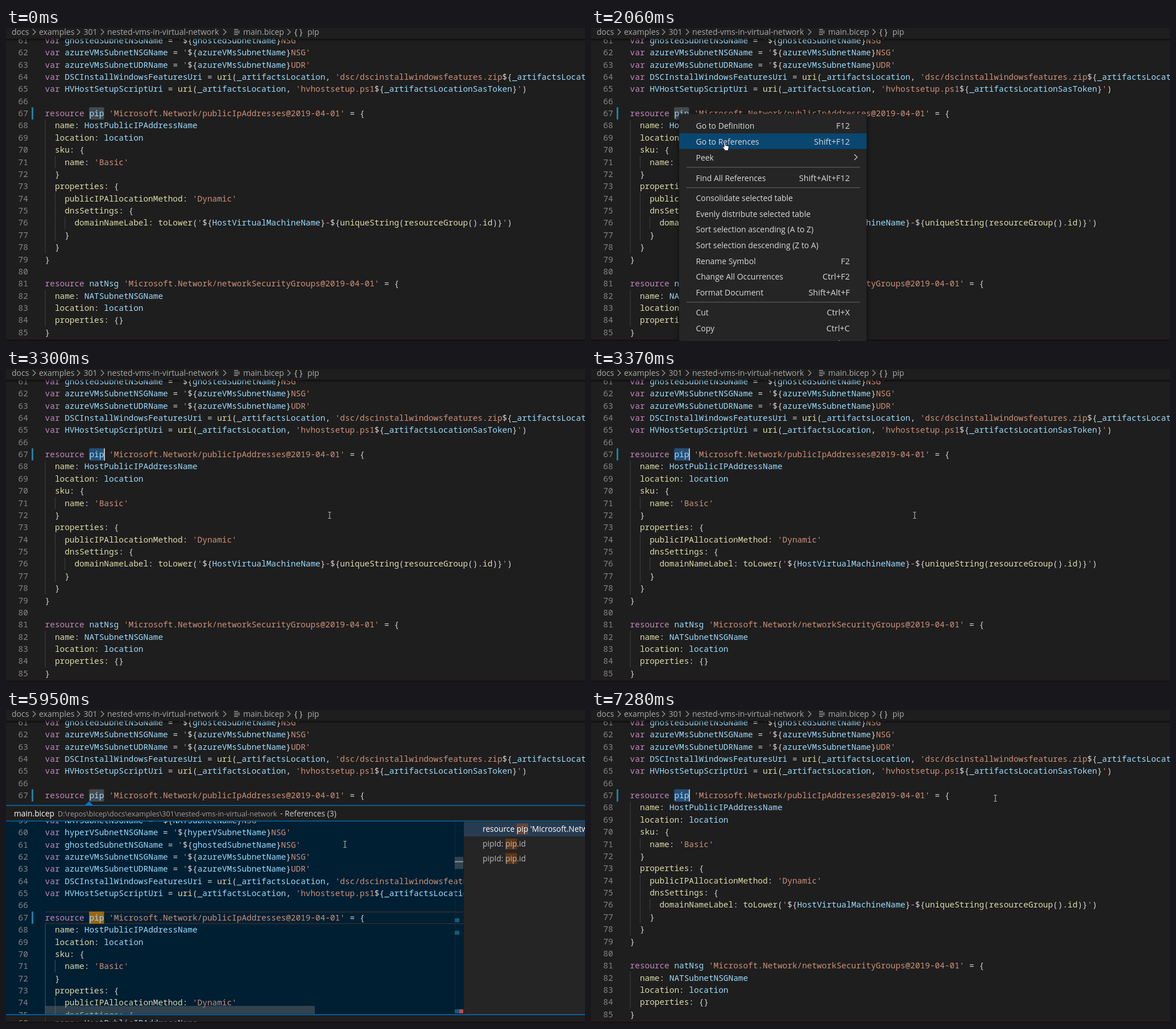
Recreate the animation shown at these times as an HTML page. Size 1018 by 550 pixels, loop 7.36 s.

```html
<!DOCTYPE html>
<html lang="en">
<head>
<meta charset="utf-8">
<title>Peek references</title>
<style>
  html, body { margin: 0; width: 100%; height: 100%; overflow: hidden; background: #1e1e1e; }
  svg { display: block; }
  text { white-space: pre; }
  .code { font: 14.41px "Noto Sans Mono", monospace; }
  .ui { font: 13.8px "Open Sans", sans-serif; fill: #ccc; }
  .item, .keys { font: 13.95px "Open Sans", sans-serif; fill: #dadada; }
  .keys { font-size: 14.5px; text-anchor: end; }
  .crumb { font: 14px "Open Sans", sans-serif; fill: #a9a9a9; }
  .box { fill: #252526; filter: drop-shadow(0 2px 4px #000a); }
</style>
</head>
<body>
<svg id="stage" width="1018" height="550" viewBox="0 0 1018 550"></svg>
<script>
const LOOP = 7360, ROW = 21.375, CHAR = 8.646, LEFT = 68.6;
const ZONE = 378.5, PEEK_SHIFT = 214.8, FIRST = 59;
const SOURCE = `var NATSubnetNSGName = '\${NATSubnetName}NSG'
var hyperVSubnetNSGName = '\${hyperVSubnetName}NSG'
var ghostedSubnetNSGName = '\${ghostedSubnetName}NSG'
var azureVMsSubnetNSGName = '\${azureVMsSubnetName}NSG'
var azureVMsSubnetUDRName = '\${azureVMsSubnetName}UDR'
var DSCInstallWindowsFeaturesUri = uri(_artifactsLocation, 'dsc/dscinstallwindowsfeatures.zip\${_artifactsLocationSasToken}')
var HVHostSetupScriptUri = uri(_artifactsLocation, 'hvhostsetup.ps1\${_artifactsLocationSasToken}')

resource pip 'Microsoft.Network/publicIpAddresses@2019-04-01' = {
  name: HostPublicIPAddressName
  location: location
  sku: {
    name: 'Basic'
  }
  properties: {
    publicIPAllocationMethod: 'Dynamic'
    dnsSettings: {
      domainNameLabel: toLower('\${HostVirtualMachineName}-\${uniqueString(resourceGroup().id)}')
    }
  }
}

resource natNsg 'Microsoft.Network/networkSecurityGroups@2019-04-01' = {
  name: NATSubnetNSGName
  location: location
  properties: {}
}`.split('\n');

const COLOR = { keyword: '#c586c0', name: '#9cdcfe', call: '#dcdcaa', string: '#ce9178', number: '#b5cea8', plain: '#d4d4d4' };

// Splits a line into coloured tspans, following string interpolation.
function highlight(line) {
  let out = '', pos = 0, inString = false, interpolating = false;
  while (pos < line.length) {
    const rest = line.slice(pos);
    const part = rest.match(inString ? /^(\$\{|'|[^'$]+)/ : /^([A-Za-z_]\w*|\d+|\s+|.)/)[0];
    let kind = 'plain';
    if (inString) {
      if (part === '${') { inString = false; interpolating = true; }
      else { kind = 'string'; inString = part !== "'"; }
    } else if (part === "'") {
      kind = 'string'; inString = true;
    } else if (part === '}' && interpolating) {
      interpolating = false; inString = true;
    } else if (/^(var|resource)$/.test(part)) kind = 'keyword';
    else if (/^\d/.test(part)) kind = 'number';
    else if (/^\w/.test(part)) {
      const next = line[pos + part.length];
      kind = next === '(' || next === ':' || line.slice(0, pos).endsWith(').') ? 'call' : 'name';
    }
    out += `<tspan fill="${COLOR[kind]}">${part}</tspan>`;
    pos += part.length;
  }
  return out;
}

const baseline = n => 48.2 + (n - 62) * ROW;
const rowTop = n => baseline(n) - 15.7;
const rect = (x, y, w, h, fill, more = '') => `<rect x="${x}" y="${y}" width="${w}" height="${h}" fill="${fill}" ${more}/>`;
const label = (x, y, text, cls = 'ui', more = '') => `<text class="${cls}" x="${x}" y="${y}" ${more}>${text}</text>`;
const chevron = (x, y, color) => `<path d="M${x} ${y - 5}l5 5l-5 5" fill="none" stroke="${color}" stroke-width="1.2"/>`;

function codeRows(from, to, guide = '#404040') {
  let out = '';
  for (let n = from; n <= to; n++) {
    const line = SOURCE[n - FIRST], indent = line.search(/\S|$/);
    for (let i = 0; i < indent / 2; i++)
      out += rect(LEFT + i * 2 * CHAR, rowTop(n), 1, ROW + .2, guide);
    if (n === 67) out += rect(45, rowTop(n), 3, ROW, '#1b81a8');
    out += label(21.5, baseline(n), n, 'code', 'fill="#858585"');
    out += label(LEFT, baseline(n), highlight(line), 'code');
  }
  return out;
}

const mark = (fill, more) => rect(146, 139.3, 26.4, 21.6, fill, more);

function breadcrumb() {
  const parts = [[10, 'docs'], [58, 'examples'], [136.5, '301'], [178, 'nested-vms-in-virtual-network'], [417, 'main.bicep'], [530, 'pip']];
  return rect(0, 0, 1018, 19, '#1e1e1e') + rect(0, 19, 1018, 5, 'url(#shade)') +
    parts.map(([x, s]) => label(x, 12, s, 'crumb')).join('') +
    [47, 125, 167, 382, 495].map(x => chevron(x, 7, '#a0a0a0')).join('') +
    '<path d="M401 2.5h7M401 5.5h10M401 8.5h10M401 11.5h7" stroke="#c5c5c5" stroke-width="1.2"/>' +
    label(507, 12, '{ }', 'crumb', 'style="fill:#c5c5c5"');
}

const MENU = [
  [172, 'Go to Definition', 'F12'], [200, 'Go to References', 'Shift+F12'], [228, 'Peek', ''],
  [263.5, 'Find All References', 'Shift+Alt+F12'],
  [299, 'Consolidate selected table', ''], [326.5, 'Evenly distribute selected table', ''],
  [354, 'Sort selection ascending (A to Z)', ''], [381.5, 'Sort selection descending (Z to A)', ''],
  [409.5, 'Rename Symbol', 'F2'], [437, 'Change All Occurrences', 'Ctrl+F2'], [464.5, 'Format Document', 'Shift+Alt+F'],
  [500, 'Cut', 'Ctrl+X'], [527.5, 'Copy', 'Ctrl+C'], [555, 'Paste', 'Ctrl+V']
];
const SUBMENU = [[228, 'Peek Definition', 'Alt+F12'], [255.5, 'Peek References', '']];

const items = (list, left, right) => list.map(([y, name, keys]) =>
  label(left, y + 5.2, name, 'item') + label(right, y + 5.2, keys, 'keys')).join('');

function peekBody() {
  const thumb = 'rgba(121,121,121,.4)';
  const tree = [[209, 'resource pip \'Microsoft.Network/publicIpAddresses', 897.5], [235.5, 'pipId: pip.id', 878], [261, 'pipId: pip.id', 878]];
  return `<g clip-path="url(#peekClip)">
    <g transform="translate(0 ${PEEK_SHIFT})">
      ${rect(69, rowTop(67), 736, 1.5, '#33302c')}${rect(69, rowTop(67) + ROW - 1, 736, 1.5, '#33302c')}
      ${mark('#9c6511')}${codeRows(59, 75, '#4c5357')}
    </g>
    ${rect(789, 196, 1, 339, '#0b2a3d')}
    ${rect(789, 366, 8, 7, '#14597a')}${rect(789, 388, 8, 7, '#14597a')}
    ${rect(789, 526, 8, 7, '#14597a')}${rect(797, 526, 7, 7, '#c04a4a')}
    <g id="bars">${rect(789, 258, 15, 21.5, thumb)}${rect(69, 520, 474, 14, thumb)}</g>
    ${rect(789, 265.5, 15, 2, '#8d979c')}
  </g>
  ${rect(805, 197, 213, 25, '#283c51')}
  ${tree.map(([y, s, x], i) => rect(x, y - 9.5, 20.5, 19, i ? '#603615' : '#624639') +
    label(838, y + 4.9, s, 'ui', `style="fill:${i ? '#bbb' : '#fff'}"`)).join('')}`;
}

const peek = () => `
  <path d="M138 168l8-7.5l8 7.5z" fill="#007acc"/>
  ${rect(0, 168, 1018, 367, '#1e1e1e')}
  ${rect(0, 195, 805, 340, '#001f33')}${rect(805, 195, 213, 340, '#252526')}
  ${label(14, 187, 'main.bicep', 'ui', 'style="fill:#fff"')}
  ${label(91, 187, 'D:\\repos\\bicep\\docs\\examples\\301\\nested-vms-in-virtual-network', 'ui', 'style="fill:#9d9d9d;font-size:12.55px"')}
  ${label(482, 187, '- References (3)')}
  <g id="peekBody">${peekBody()}</g>
  ${rect(0, 167, 1018, 1.3, '#007acc')}${rect(0, 194.5, 1018, 1.2, '#007acc')}${rect(0, 534.7, 1018, 1.4, '#007acc')}`;

const hover = () => rect(146.5, 87.5, 417, 52, '#252526', 'stroke="#454545"') +
  label(155.5, 108, highlight('resource pip'), 'code') +
  label(155.5, 129.5, highlight('Microsoft.Network/publicIpAddresses@2019-04-01'), 'code');

const stage = document.getElementById('stage');
stage.innerHTML = `
  <defs>
    <linearGradient id="shade" x2="0" y2="1"><stop stop-color="#000" stop-opacity=".55"/><stop offset="1" stop-opacity="0"/></linearGradient>
    <clipPath id="peekClip"><rect y="195.5" width="804.5" height="339"/></clipPath>
  </defs>
  ${rect(0, 0, 1018, 550, '#1e1e1e')}
  <g id="wordMark">${mark('#45494d', 'rx="2"')}</g>
  <g id="selection">${mark('#264f78', 'rx="3"')}${rect(172, 139.5, 1.8, 21.4, '#d0d0d0')}</g>
  ${codeRows(61, 67)}
  <g id="lower">${codeRows(68, 85)}</g>
  ${breadcrumb()}
  ${rect(0, 547.5, 1018, 3, '#181015')}
  <g id="hover">${mark('#264f7866')}${hover()}</g>
  <g id="peek">${peek()}</g>
  <g id="menu">
    ${rect(155, 151, 329.5, 420, '#252526', 'class="box"')}
    ${rect(155, 0, 329.5, 27.2, '#094771', 'id="menuRow"')}
    ${items(MENU, 184.5, 455)}${chevron(463, 227, '#d0d0d0')}
    ${[244.2, 280, 481.2].map(y => rect(168, y, 305, 1.1, '#616161')).join('')}
  </g>
  <g id="submenu">
    ${rect(485, 206, 266.5, 69.5, '#252526', 'class="box"')}
    ${rect(485, 0, 266.5, 27.2, '#094771', 'id="subRow"')}
    ${items(SUBMENU, 514.5, 721)}
  </g>
  <g id="ibeam"><path d="M-2.5 -5.5H-.7L0 -5L.7 -5.5H2.5M0 -5V5M-2.5 5.5H-.7L0 5L.7 5.5H2.5" fill="none" stroke="#c8c8c8"/></g>
  <path id="arrow" d="M0 0V11.5L2.7 9L4.6 13L6.5 12.2L4.7 8.3H8.3Z" fill="#fff" stroke="#000" stroke-width=".7"/>
  <path id="hand" d="M-1.3 .8Q0 -.8 1.2 .8V5L6 6.2Q7.2 6.6 7 8.2L6 12V14H-.6V12.2L-4 8.4Q-4.4 6.8 -2.8 7.2L-1.3 8.4Z" fill="#fff" stroke="#000" stroke-width=".8"/>`;

const el = Object.fromEntries([...stage.querySelectorAll('[id]')].map(node => [node.id, node]));

// time, x, y of the pointer's hot spot
const PATH = [
  [150, 857, 553], [300, 755, 440], [480, 520, 280], [640, 280, 175], [760, 165, 148], [860, 157, 150],
  [1820, 157, 151], [1900, 175, 163], [2000, 215, 190], [2120, 255, 212], [2210, 266, 219],
  [2600, 272, 219], [2670, 298, 219], [2760, 340, 220], [2850, 430, 224], [2920, 500, 231], [3000, 545, 246], [3140, 569, 257],
  [4560, 569, 257], [4620, 571, 257], [4700, 660, 250], [4780, 800, 236], [4860, 875, 222], [5100, 930, 208], [5320, 935, 202],
  [5400, 934, 202], [5560, 880, 212], [5660, 800, 222], [5800, 660, 232], [5950, 596, 236], [6100, 592, 237],
  [6180, 720, 232], [6240, 810, 228], [6400, 950, 222], [6520, 1030, 219]
];

function pointerAt(t) {
  if (t >= 7280) return [711, 155];
  if (t < PATH[0][0] || t > PATH.at(-1)[0]) return null;
  const i = Math.max(1, PATH.findIndex(key => key[0] >= t));
  const [t0, x0, y0] = PATH[i - 1], [t1, x1, y1] = PATH[i], k = (t - t0) / (t1 - t0);
  return [x0 + (x1 - x0) * k, y0 + (y1 - y0) * k];
}

const clamp = v => Math.min(1, Math.max(0, v));
const show = (node, on) => node.setAttribute('visibility', on ? 'visible' : 'hidden');
const within = (t, a, b) => t >= a && t < b;

function placeRow(node, list, y, on) {
  const item = list.find(([center]) => Math.abs(center - y) <= 14);
  show(node, on && item);
  if (item) node.setAttribute('y', item[0] - 14.8);
}

function barsOpacity(t) {
  if (t < 5670) return 1 - clamp((t - 4790) / 800);
  return t < 6220 ? clamp((t - 5670) / 100) : 1 - clamp((t - 6220) / 800);
}

function render(t) {
  const menuOpen = within(t, 1420, 3300), subOpen = within(t, 2430, 3300), peekOpen = within(t, 3380, 7280);
  const selected = t >= 3300 && !peekOpen;
  show(el.wordMark, !selected);
  show(el.selection, selected);
  show(el.menu, menuOpen);
  show(el.submenu, subOpen);
  show(el.peek, peekOpen);
  show(el.peekBody, peekOpen && t >= 3450);
  el.lower.setAttribute('transform', `translate(0 ${peekOpen ? ZONE : 0})`);
  el.hover.setAttribute('opacity', t < 1420 ? clamp((t - 900) / 250) : 0);
  el.bars.setAttribute('opacity', barsOpacity(t));

  const spot = pointerAt(t), [x, y] = spot || [0, 0];
  const overSub = subOpen && x > 485;
  placeRow(el.menuRow, MENU, overSub ? 228 : y, menuOpen && t >= 1820 && y > 158);
  placeRow(el.subRow, SUBMENU, y, overSub);

  const overTree = peekOpen && x > 805;
  const shape = menuOpen ? (t < 1820 ? 'arrow' : 'hand') : overTree ? 'hand' : 'ibeam';
  for (const name of ['ibeam', 'arrow', 'hand']) {
    show(el[name], spot && name === shape);
    el[name].setAttribute('transform', `translate(${x} ${y})`);
  }
}

const start = performance.now();
function tick() {
  render((performance.now() - start) % LOOP);
  requestAnimationFrame(tick);
}
tick();
</script>
</body>
</html>
```
